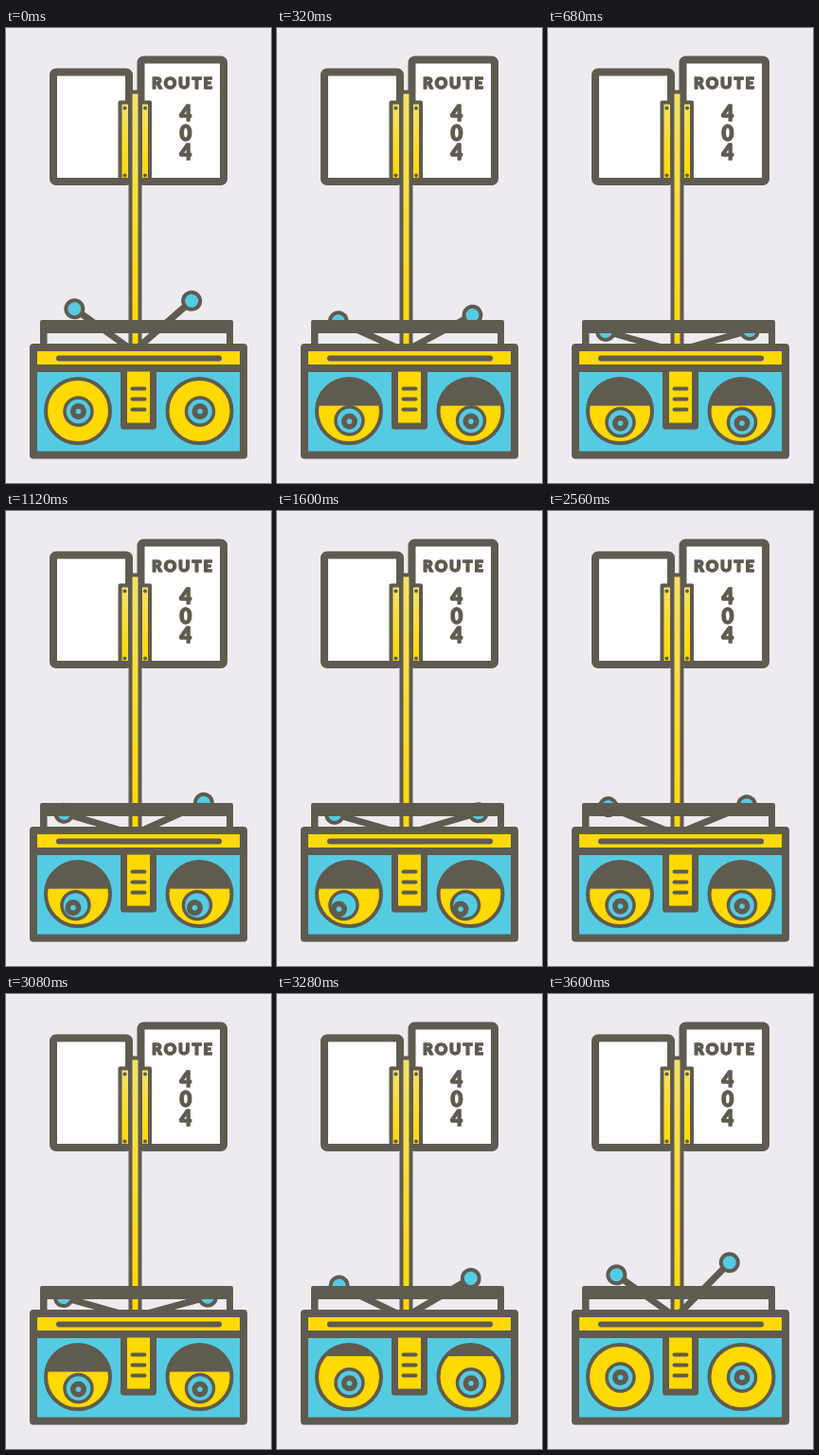
Animation, 280 px wide and 480 px high, one loop 3.64 s. Source, as an HTML page:

```html
<!DOCTYPE html>
<html lang="en">
<head>
<meta charset="utf-8">
<title>Route 404</title>
<style>
  html, body { margin: 0; width: 100%; height: 100%; overflow: hidden; background: #edebef; }
  svg { display: block; width: 280px; height: 480px; }
  .line { fill: none; stroke: #5f5b50; stroke-linecap: round; stroke-linejoin: round; }
  .ink { fill: #5f5b50; }
  .white { fill: #fff; }
  .yellow { fill: #ffd900; }
  .cyan { fill: #55cbe2; }
  .brass { fill: url(#brass); }
  text { font-family: Lato, sans-serif; font-weight: 900; text-anchor: middle;
         fill: #5f5b50; stroke: #5f5b50; stroke-width: 1.3; stroke-linejoin: round; }
</style>
</head>
<body>
<svg viewBox="0 0 280 480">
  <defs>
    <linearGradient id="brass" x2="0" y2="1">
      <stop stop-color="#f5e168"/><stop offset="1" stop-color="#ffd800"/>
    </linearGradient>
    <clipPath id="eyeball"><circle cx="76" cy="404" r="34"/></clipPath>
  </defs>

  <g class="line" stroke-width="8">
    <rect class="white" x="50" y="46.5" width="80" height="115.500" rx="3"/>
    <rect class="white" x="142.500" y="33.500" width="87.500" height="128.500" rx="3"/>
  </g>
  <text x="187" y="64" font-size="16.500" letter-spacing="2">ROUTE</text>
  <g font-size="22">
    <text x="190" y="97.500">4</text>
    <text x="190" y="118.500">0</text>
    <text x="190" y="139">4</text>
  </g>

  <g class="line brass" stroke-width="4">
    <rect x="120.500" y="78.500" width="10.500" height="81.500"/>
    <rect x="142" y="78.500" width="10" height="81.500"/>
    <rect x="131.500" y="67.500" width="10" height="270"/>
  </g>
  <g class="ink">
    <circle cx="125.500" cy="84.500" r="2"/><circle cx="125.500" cy="155.500" r="2"/>
    <circle cx="147" cy="84.500" r="2"/><circle cx="147" cy="155.500" r="2"/>
  </g>

  <g class="line">
    <g id="left"><path stroke-width="7" d="M135 341H211"/>
      <circle class="cyan" stroke-width="4" cx="212" cy="341" r="9"/></g>
    <g id="right"><path stroke-width="7" d="M135 341H215"/>
      <circle class="cyan" stroke-width="4" cx="216" cy="341" r="9"/></g>
  </g>

  <path class="ink" d="M38 308H238Q240 308 240 310V336H233V322H43.500V336H36V310Q36 308 38 308Z"/>
  <rect class="cyan" x="28" y="337" width="224" height="114"/>
  <rect class="yellow" x="28" y="337" width="224" height="22"/>
  <path class="line" stroke-width="8" d="M29 337H251V450.500H29ZM29 359H251"/>
  <path class="line" stroke-width="6" d="M56 348.500H225"/>
  <rect class="line yellow" stroke-width="7" x="124.500" y="359" width="31" height="61"/>
  <path class="line" stroke-width="4" d="M133.500 380.500H146.500M133.500 391.500H146.500M133.500 402.500H146.500"/>

  <g id="eye">
    <circle class="yellow" cx="76" cy="404" r="34"/>
    <g clip-path="url(#eyeball)">
      <circle id="iris" class="line cyan" stroke-width="3.500" r="14.500"/>
      <g id="pupil"><circle class="ink" r="8.500"/><circle class="cyan" r="2.800"/></g>
      <rect id="lid" class="ink" x="40" y="366" width="72"/>
    </g>
    <circle class="line" stroke-width="4" cx="76" cy="404" r="34"/>
  </g>
  <use href="#eye" x="128.500"/>
</svg>
<script>
const LOOP = 3640;
const $ = id => document.getElementById(id);
const place = (id, transform) => $(id).setAttribute('transform', transform);

// Smooth step from 0 to 1 between two times.
function ramp(t, from, to) {
  const p = Math.min(1, Math.max(0, (t - from) / (to - from)));
  return p * p * (3 - 2 * p);
}

// One smooth lift and fall around its peak time.
function lift(t, peak) {
  const p = (t - peak) / 1120;
  return Math.abs(p) < 0.5 ? Math.cos(Math.PI * p) ** 2 : 0;
}

function draw(t) {
  const wake = ramp(t, 3080, 3480);
  const tired = end => ramp(t, 80, end) - wake;
  const look = ramp(t, 960, 1280) - ramp(t, 1840, 2440);

  const leftAngle = 35.5 - 19.7 * tired(520) + lift(t, 1160) + 12.5 * lift(t, 2280);
  const rightAngle = 41 - 25.7 * tired(560) + 9 * lift(t, 1160) + 14 * lift(t, 2280) + 4.5 * wake;
  place('left', `rotate(${180 + leftAngle} 135 341)`);
  place('right', `rotate(${-rightAngle} 135 341)`);

  const eyeY = 404.5 + 11.5 * tired(400);
  place('iris', `translate(${76.5 - 6 * look} ${eyeY})`);
  place('pupil', `translate(${76.5 - 11 * look} ${eyeY + tired(400) + 3 * look})`);
  $('lid').setAttribute('height', 32.5 * tired(320));
}

const start = performance.now();
function tick() {
  draw((performance.now() - start) % LOOP);
  requestAnimationFrame(tick);
}
tick();
</script>
</body>
</html>
```
